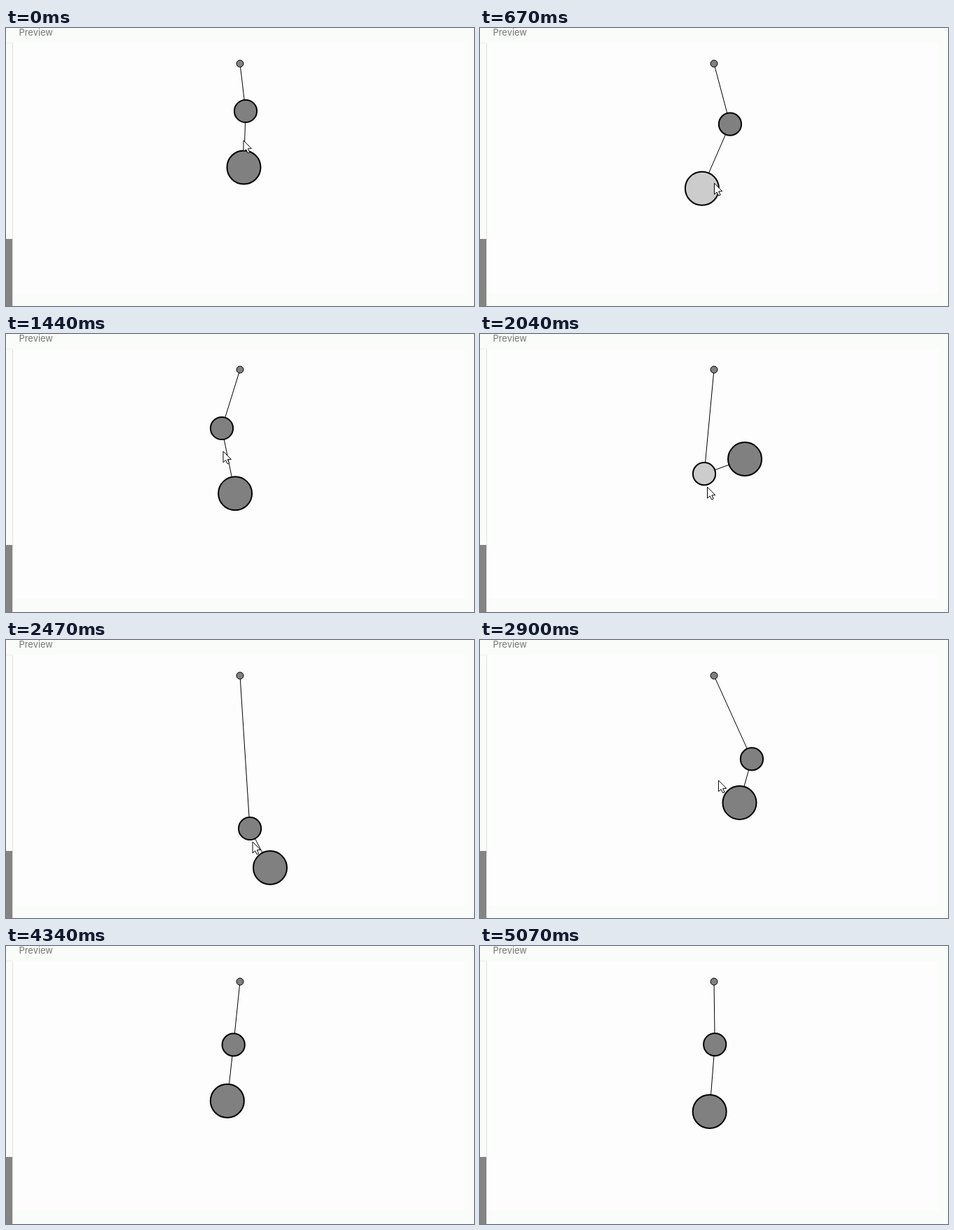
Recreate the animation shown at these times as an HTML page with a canvas. Size 668 by 398 pixels, loop 5.1 s.

```html
<!DOCTYPE html>
<html lang="en">
<head>
<meta charset="utf-8">
<title>Spring chain</title>
<style>
  html, body { margin: 0; width: 100%; height: 100%; overflow: hidden; }
  canvas { display: block; }
</style>
</head>
<body>
<canvas id="stage" width="668" height="398"></canvas>
<script>
const LOOP = 5100, SWING_START = 2900, POINTER_END = 4230;
const ctx = document.getElementById('stage').getContext('2d');
const ANCHOR = [334, 51];
const DARK = '#808080', LIT = '#cccccc';

// Poses while the chain is dragged: time, joint x, joint y, bob x, bob y
const poses = [
  [0, 342, 119, 339.5, 199.5],
  [540, 351, 124, 317, 204],
  [670, 357, 137.5, 317, 229.5],
  [1090, 322, 200, 291, 348],
  [1440, 308, 135, 327, 228.5],
  [2040, 320, 200, 378, 179],
  [2470, 348, 270, 377, 326],
  [SWING_START, 388, 170.5, 370.5, 233]
];

// time, pointer x, pointer y
const pointer = [
  [0, 339, 161], [670, 334.5, 222], [1060, 308, 341], [1440, 310, 168],
  [2040, 324.5, 219], [2470, 352, 289], [2900, 340.5, 201],
  [3640, 258.5, 217], [POINTER_END, 250, 388]
];

// Smooth cubic path through timed points
function sample(keys, t) {
  const last = keys.length - 1;
  const i = keys.findIndex(k => k[0] > t) - 1;
  const a = keys[i], b = keys[i + 1];
  const before = keys[Math.max(i - 1, 0)], after = keys[Math.min(i + 2, last)];
  const span = b[0] - a[0], u = (t - a[0]) / span;
  return a.slice(1).map((p, n) => {
    const c = n + 1, d = b[c] - p;
    const m0 = (b[c] - before[c]) / (b[0] - before[0]) * span;
    const m1 = (after[c] - p) / (after[0] - a[0]) * span;
    return p + u * (m0 + u * (3 * d - 2 * m0 - m1 + u * (m0 + m1 - 2 * d)));
  });
}

// Free damped swing, s in seconds since release
function swing(s) {
  const wave = (rest, size, decay, speed, phase) =>
    rest + size * Math.exp(-decay * s) * Math.cos(speed * s + phase);
  return [
    wave(334, 54, 1.2, 6.37, 0),
    wave(141, 29.5, 3, 0, 0),
    wave(332.5, 52, 0.7, 6.37, 0.745),
    wave(225, 12, 0, 11.22, 0.84)
  ];
}

function rect(color, x, y, w, h) {
  ctx.fillStyle = color;
  ctx.fillRect(x, y, w, h);
}

function line(a, b) {
  ctx.lineWidth = 1;
  ctx.beginPath();
  ctx.moveTo(...a);
  ctx.lineTo(...b);
  ctx.stroke();
}

function ball([x, y], r, width, fill) {
  ctx.lineWidth = width;
  ctx.fillStyle = fill;
  ctx.beginPath();
  ctx.arc(x, y, r, 0, Math.PI * 2);
  ctx.fill();
  ctx.stroke();
}

function drawPanel() {
  rect('#fafcf9', 0, 0, 668, 398);
  rect('#fcfdfc', 10, 21, 645, 359);
  rect('#e0e0e0', 9, 21, 1, 377);
  rect('#eeeeee', 0, 21, 10, 1);
  rect('#848484', 0, 302, 9, 96);
  ctx.fillStyle = '#777777';
  ctx.font = '12.9px Inter, "Open Sans", sans-serif';
  ctx.fillText('Preview', 18.5, 11);
}

function drawPointer([x, y]) {
  ctx.save();
  ctx.translate(x, y);
  ctx.lineWidth = 1;
  ctx.fillStyle = '#ffffff';
  ctx.beginPath();
  ctx.moveTo(0, 0);
  for (const p of [[0, 16], [3.6, 12.8], [6.2, 18], [8.7, 16.8], [6.3, 11.8], [11.3, 11.5]]) ctx.lineTo(...p);
  ctx.closePath();
  ctx.fill();
  ctx.stroke();
  ctx.restore();
}

function draw(t) {
  const [jx, jy, bx, by] = t < SWING_START ? sample(poses, t) : swing((t - SWING_START) / 1000);
  const joint = [jx, jy], bob = [bx, by];
  drawPanel();
  ctx.strokeStyle = '#000000';
  line(ANCHOR, joint);
  line(joint, bob);
  ball(ANCHOR, 5, 1, DARK);
  ball(joint, 16.1, 2, t > 1640 && t < 2470 ? LIT : DARK);
  ball(bob, 24, 2, t > 540 && t < 1090 ? LIT : DARK);
  if (t < POINTER_END) drawPointer(sample(pointer, t));
}

const start = performance.now();
function tick() {
  draw((performance.now() - start) % LOOP);
  requestAnimationFrame(tick);
}
tick();
</script>
</body>
</html>
```
